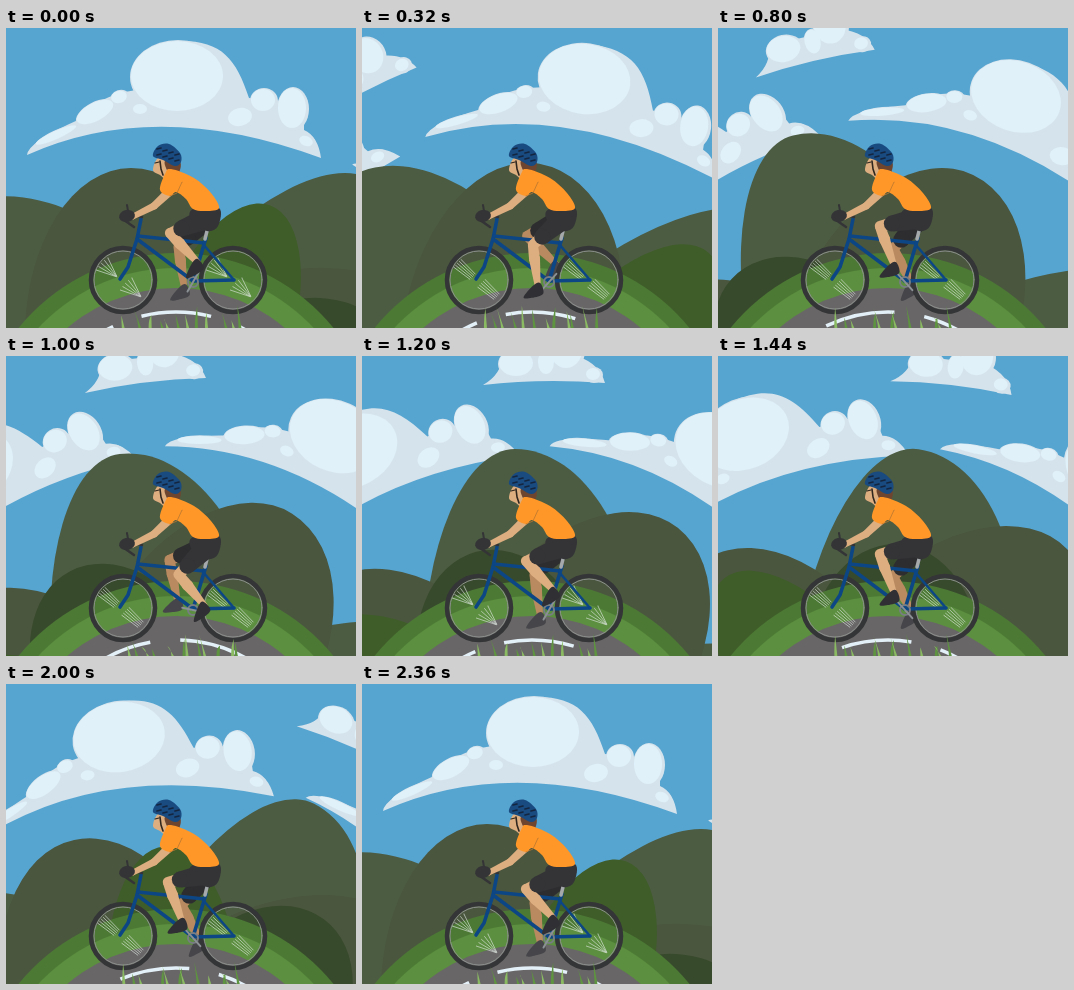
An HTML page with a canvas that plays this animation: 350 by 300 pixels, repeating every 2.4 s.

```html
<!DOCTYPE html>
<html lang="en">
<head>
<meta charset="utf-8">
<title>Cyclist on a small world</title>
<style>
html, body { margin: 0; width: 100%; height: 100%; overflow: hidden; background: #56a4d0; }
canvas { display: block; }
</style>
</head>
<body>
<canvas id="stage" width="350" height="300"></canvas>
<script>
const ctx = document.getElementById('stage').getContext('2d');
const LOOP = 2400, STEP = 40, TURN = LOOP - STEP;
const CX = 175, CY = 428, RAD = Math.PI / 180;
const SKIN = '#ddae80', SKIN_FAR = '#b98a60', DARK = '#343437', BLUE = '#0c4684';

const random = seed => {
  const s = Math.sin(seed * 127.1) * 43758.5;
  return s - Math.floor(s);
};
const mix = (p, q, k) => [p[0] + (q[0] - p[0]) * k, p[1] + (q[1] - p[1]) * k];

function fill(color) {
  ctx.fillStyle = color;
  ctx.fill();
}

// Closed curve through the given key points.
function smooth(points, color) {
  const n = points.length, at = i => points[(i + n) % n];
  ctx.beginPath();
  ctx.moveTo(...points[0]);
  for (let i = 0; i < n; i++) {
    const [a, b, c, d] = [at(i - 1), at(i), at(i + 1), at(i + 2)];
    ctx.bezierCurveTo(b[0] + (c[0] - a[0]) / 6, b[1] + (c[1] - a[1]) / 6,
      c[0] - (d[0] - b[0]) / 6, c[1] - (d[1] - b[1]) / 6, ...c);
  }
  fill(color);
}

function oval(x, y, rx, ry, color, tilt = 0) {
  ctx.beginPath();
  ctx.ellipse(x, y, rx, ry, tilt, 0, 7);
  fill(color);
}

function ring(x, y, r, color, width) {
  ctx.beginPath();
  ctx.arc(x, y, r, 0, 2 * Math.PI);
  ctx.strokeStyle = color;
  ctx.lineWidth = width;
  ctx.stroke();
}

function line(color, width, ...points) {
  ctx.beginPath();
  points.forEach(p => ctx.lineTo(...p));
  ctx.strokeStyle = color;
  ctx.lineWidth = width;
  ctx.stroke();
}

// A limb that narrows from half-width w1 at p to w2 at q.
function taper(p, q, w1, w2, color) {
  const len = Math.hypot(q[0] - p[0], q[1] - p[1]);
  const nx = (p[1] - q[1]) / len, ny = (q[0] - p[0]) / len;
  ctx.beginPath();
  ctx.moveTo(p[0] + nx * w1, p[1] + ny * w1);
  ctx.lineTo(q[0] + nx * w2, q[1] + ny * w2);
  ctx.lineTo(q[0] - nx * w2, q[1] - ny * w2);
  ctx.lineTo(p[0] - nx * w1, p[1] - ny * w1);
  fill(color);
  oval(...q, w2, w2, color);
}

// Turns a piece of scenery about the planet; copies follow one sweep apart.
function orbit(t, restTime, sweep, draw) {
  for (let k = -1; k <= 1; k++) {
    ctx.save();
    ctx.translate(CX, CY);
    ctx.rotate(sweep * ((t - restTime) / TURN + k) * RAD);
    ctx.translate(-CX, -CY);
    draw();
    ctx.restore();
  }
}

function puffs(list) {
  for (const [x, y, rx, ry, tilt] of list) oval(x + 1, y + 1, rx + 2, ry + 2, '#d5e3ec', tilt);
  for (const [x, y, rx, ry, tilt] of list) oval(x, y, rx, ry, '#e0f1fa', tilt);
}

function bigCloud() {
  ctx.beginPath();
  ctx.moveTo(21, 127);
  ctx.quadraticCurveTo(150, 69, 315, 130);
  ctx.quadraticCurveTo(312, 108, 298, 102);
  ctx.lineTo(298, 76);
  ctx.lineTo(243, 70);
  ctx.bezierCurveTo(230, 30, 215, 12, 172, 13);
  ctx.lineTo(130, 62);
  ctx.quadraticCurveTo(90, 68, 72, 92);
  ctx.quadraticCurveTo(22, 114, 21, 127);
  fill('#d5e3ec');
  puffs([[171, 48, 46, 35, 0], [89, 84, 20, 9, -.48], [113, 69, 8, 6, -.3],
    [50, 107, 22, 4, -.42], [257, 72, 12, 11, 0], [286, 80, 14, 20, 0],
    [234, 89, 12, 9, -.2], [134, 81, 7, 5, 0], [300, 113, 7, 5, .4]]);
}

function smallCloud() {
  ctx.beginPath();
  ctx.moveTo(121, 29);
  ctx.quadraticCurveTo(180, 22, 243, 27);
  ctx.quadraticCurveTo(238, 8, 215, 0);
  ctx.lineTo(140, 0);
  ctx.quadraticCurveTo(140, 18, 121, 29);
  fill('#d5e3ec');
  puffs([[154, 7, 17, 13, 0], [204, -6, 16, 18, 0], [184, 6, 8, 12, 0], [231, 18, 7, 6, 0]]);
}

// Two quarter ellipses that meet at the peak.
function hill(x, top, left, right, color) {
  const base = 308;
  ctx.beginPath();
  ctx.ellipse(x, base, left, base - top, 0, Math.PI, 1.5 * Math.PI);
  ctx.ellipse(x, base, right, base - top, 0, 1.5 * Math.PI, 2 * Math.PI);
  ctx.lineTo(x + right, base + 40);
  ctx.lineTo(x - left, base + 40);
  fill(color);
}

function ground(t) {
  const x = 170;
  oval(x, CY, 203, 203, '#4c7a35');
  oval(x, CY, 188, 188, '#5c8f3f');
  oval(x, CY, 168, 168, '#686667');
  const r = 144, dash = 28 * RAD * r, gap = 12 * RAD * r;
  ctx.lineCap = 'butt';
  ctx.setLineDash([dash, gap]);
  ctx.lineDashOffset = -(8 * t / TURN * (dash + gap)) - 16 * RAD * r;
  ring(x, CY, r, '#e4f0f7', 3.5);
  ctx.setLineDash([]);
  ctx.lineCap = 'round';
}

function grass(pose) {
  for (let i = 0; i < 12; i++) {
    const seed = pose * 20 + i + 1;
    const x = 114 + 10.5 * i + 12 * random(seed), tip = 276 + 16 * random(seed + 0.5);
    ctx.beginPath();
    ctx.moveTo(x - 1.5, 301);
    ctx.quadraticCurveTo(x - 2, 292, x - 7 + 9 * random(seed + 0.3), tip);
    ctx.lineTo(x + 1.5, 301);
    fill(i % 2 ? '#5e9440' : '#8aba62');
  }
}

function wheel(x, pose) {
  const y = 252;
  ring(x, y, 32, '#343536', 4.6);
  ring(x, y, 29, '#8b8f8c', 1);
  const fan = pose === 0 ? .2 : .04;
  for (const [gx, gy] of [[x - 14, y - 10], [x + 10, y + 10]]) {
    for (let i = -2; i <= 2; i++) {
      const a = .72 + i * fan, dx = 10 * Math.cos(a), dy = 10 * Math.sin(a);
      const ox = i * 1.6, oy = -i * 1.6;
      line('rgba(222,230,224,.8)', .8, [gx - dx + ox, gy - dy + oy], [gx + dx + ox, gy + dy + oy]);
    }
  }
}

// Two equal bones from hip to ankle, the knee bending forward.
function leg(phase, near) {
  const a = phase * RAD, hip = [202, 190];
  const shoe = [181 - 14 * Math.sin(a), 253 - 14 * Math.cos(a)];
  const ankle = [shoe[0] + 4, shoe[1] - 6];
  const dx = ankle[0] - hip[0], dy = ankle[1] - hip[1], d = Math.hypot(dx, dy);
  const bend = Math.sqrt(Math.max(0, 41 ** 2 - d * d / 4));
  const knee = [hip[0] + dx / 2 - dy / d * bend, hip[1] + dy / 2 + dx / d * bend];
  const skin = near ? SKIN : SKIN_FAR, calf = mix(knee, ankle, .35);
  taper(hip, knee, 9, 5, skin);
  taper(knee, calf, 5, 5.5, skin);
  taper(calf, ankle, 5.5, 3, skin);
  taper(hip, mix(hip, knee, .7), 11, 8, near ? DARK : '#2d2d30');
  ctx.save();
  ctx.translate(...shoe);
  ctx.rotate(-.35 + .25 * Math.sin(a));
  smooth([[-11, 4], [1, -6], [8, -7], [9, 4], [-3, 6]], near ? '#303034' : '#46464a');
  ctx.restore();
}

function crank(phase) {
  const dx = 11 * Math.sin(phase * RAD), dy = 11 * Math.cos(phase * RAD);
  ring(187, 254, 5, '#777d82', 2);
  line('#8a9094', 2, [187 - dx, 254 - dy], [187 + dx, 254 + dy]);
}

function bike() {
  const crankset = [187, 253], hub = [228, 252], head = [131, 211];
  line(BLUE, 3.6, crankset, hub);
  line(BLUE, 2.6, [197, 216], hub);
  line(BLUE, 3.6, [135, 191], head, [122, 239], [114, 251]);
  line(BLUE, 3.6, [132, 208], [198, 215]);
  line(BLUE, 3.6, head, crankset);
  line(BLUE, 3.6, [200, 210], crankset);
  line('#a5a9ab', 3.5, [201, 203], [199, 211]);
}

function rider() {
  // Head
  smooth([[153, 129], [147, 142], [154, 147], [160, 151], [170, 148], [168, 130]], SKIN);
  smooth([[159, 133], [163, 145], [172, 146], [174, 134]], '#6e4630');
  line('#30271f', 1.2, [149, 135], [153, 134]);
  line('#30271f', 1.6, [154, 133], [155, 141], [157, 147]);
  smooth([[147, 128], [152, 118], [163, 116], [174, 125], [175, 134], [169, 138], [157, 132]], '#194a80');
  for (let i = 0; i < 8; i++) {
    const x = 151 + 6 * (i % 4), y = 121 + 6 * (i >> 2) + 2 * (i % 4);
    line('#14263f', 1.7, [x, y], [x + 4, y - 1]);
  }
  // Arm, handlebar and glove
  line(DARK, 2.5, [136, 189], [119, 185], [118, 192], [128, 199]);
  line(DARK, 2, [122, 183], [121, 177]);
  taper([164, 163], [148, 178], 4.5, 3.6, SKIN);
  taper([148, 178], [126, 189], 3.6, 2.8, SKIN);
  oval(121, 188, 8, 6, DARK, -.2);
  // Jersey
  smooth([[159, 146], [165, 141], [188, 150], [205, 165], [213, 180], [200, 183],
    [187, 181], [180, 171], [170, 164], [164, 168], [154, 162]], '#ff9728');
  line('#b97832', .8, [176, 154], [171, 165], [164, 168]);
}

function frame(t) {
  const pose = Math.floor((t + 50) % 600 / 150);
  const phase = 60 * pose + 12 * pose * pose - 30;
  ctx.fillStyle = '#56a4d0';
  ctx.fillRect(0, 0, 350, 300);
  ctx.lineCap = ctx.lineJoin = 'round';
  orbit(t, 0, 57.5, bigCloud);
  orbit(t, 1200, 72, smallCloud);
  orbit(t, 1200, 80, () => hill(153, 93, 92, 128, '#4c5c42'));
  orbit(t, 0, 76, () => hill(125, 140, 106, 113, '#4a563e'));
  orbit(t, 1430, 151, () => hill(CX, 188, 88, 88, '#384a2c'));
  orbit(t, 2055, 151, () => hill(CX, 162, 67, 67, '#3f5d29'));
  ground(t);
  leg(phase + 180, false);
  wheel(117, pose);
  wheel(227, pose);
  bike();
  crank(phase);
  leg(phase, true);
  smooth([[187, 181], [213, 180], [212, 198], [201, 203], [185, 192]], DARK);
  rider();
  grass(pose);
}

const start = performance.now();
function tick() {
  const t = (performance.now() - start) % LOOP;
  frame(Math.floor(t / STEP) * STEP);
  requestAnimationFrame(tick);
}
tick();
</script>
</body>
</html>
```
